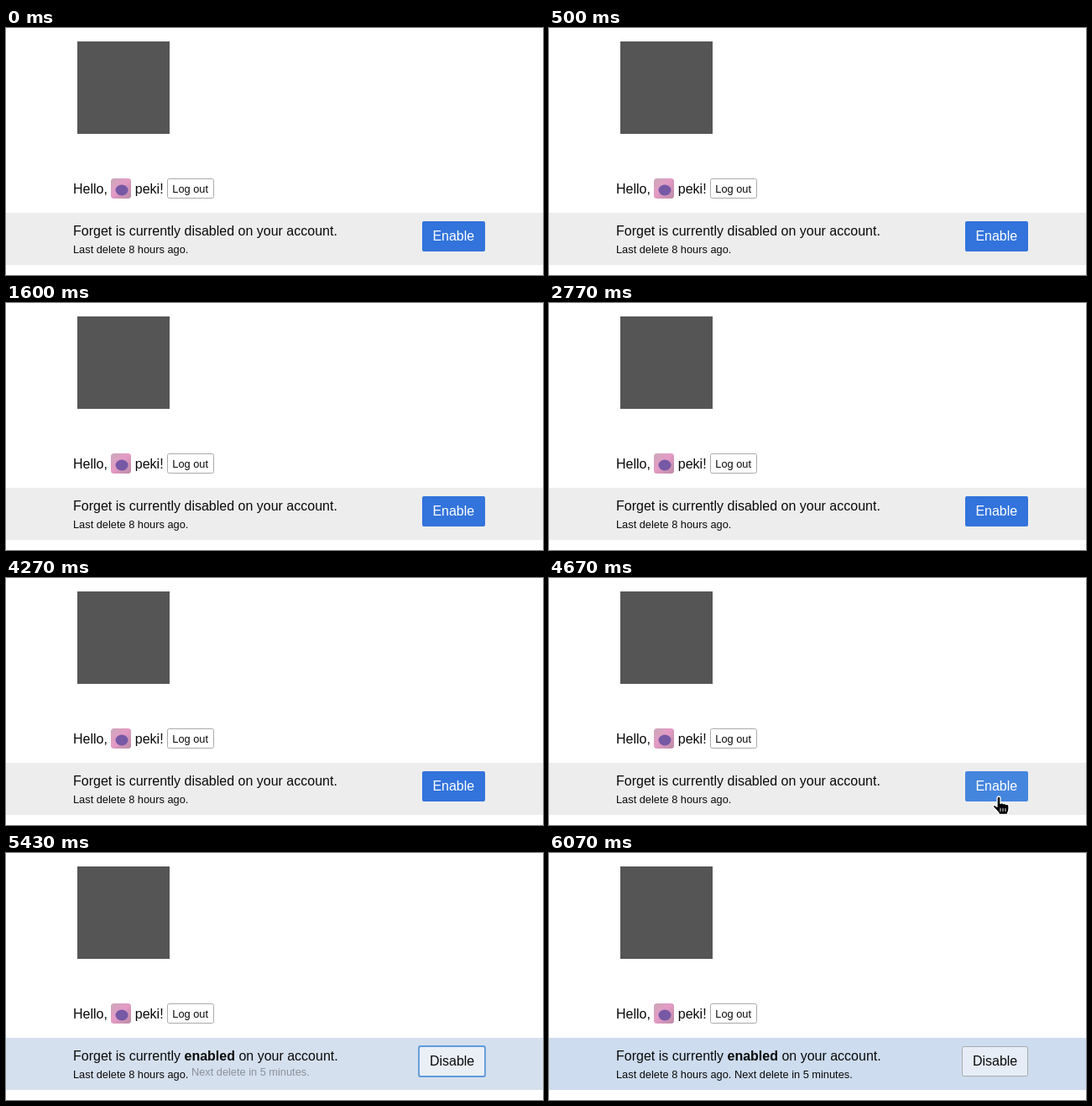
Recreate the animation shown at these times as an HTML page. Size 640x294 px, loop 8000 ms.

```html
<!DOCTYPE html>
<html lang="en">
<head>
<meta charset="utf-8">
<title>Account status</title>
<style>
  html, body { margin: 0; width: 100%; height: 100%; overflow: hidden; background: #fff; }
  svg { display: block; }
  text { font: 16px "Liberation Sans", Arial, sans-serif; fill: #0a0a0a; white-space: pre; }
  .small { font-size: 12.8px; }
  .light { fill: #fff; }
  .bold { font-weight: bold; }
</style>
</head>
<body>
<svg width="640" height="294" viewBox="0 0 640 294">
  <defs>
    <linearGradient id="pink" x2="1" y2="1">
      <stop offset="0" stop-color="#c9a9b8"/>
      <stop offset=".45" stop-color="#e59bc6"/>
      <stop offset="1" stop-color="#b98ba6"/>
    </linearGradient>
  </defs>

  <rect x="85" y="16" width="110" height="110" fill="#555"/>

  <text x="80" y="197">Hello,</text>
  <rect x="125" y="179" width="24" height="24" rx="3.5" fill="url(#pink)"/>
  <ellipse cx="138" cy="193" rx="7.5" ry="6.5" fill="#7658a5"/>
  <text x="153.8" y="197">peki!</text>
  <rect x="192.5" y="179.5" width="55" height="23" rx="2" fill="#fff" stroke="#aaa"/>
  <text class="small" x="198.3" y="196">Log out</text>

  <rect id="band" y="220" width="640" height="62"/>
  <text id="disabledText" x="80" y="247">Forget is currently disabled on your account.</text>
  <text id="enabledText" x="80" y="247">Forget is currently <tspan class="bold">enabled</tspan> on your account.</text>
  <text class="small" x="80" y="268">Last delete 8 hours ago.</text>
  <text id="next" class="small" x="220.9" y="268">Next delete in 5 minutes.</text>

  <g id="enable">
    <rect id="enableFill" x="496" y="230" width="75" height="36" rx="2"/>
    <text class="light" x="508.4" y="253">Enable</text>
  </g>
  <g id="disable">
    <rect x="492.5" y="230.5" width="78" height="35" rx="2" fill="#fff" fill-opacity=".5" stroke="#aaa"/>
    <text x="504.9" y="253">Disable</text>
  </g>
  <rect id="ring" y="230" height="36" rx="2" fill="none" stroke-width="1.8"/>

  <g id="cursor" fill="#000" stroke="#fff" stroke-width="1.3" stroke-linejoin="round">
    <path id="arrow" d="M0 0V16L4 12.5L6.8 18.5L9.6 17.2L6.9 11.4H12Z"/>
    <g id="hand">
      <path d="M-2 1.5Q-2-1 0-1T2 1.5V7.5Q4 5.8 5.4 7.8Q7.4 6.6 8.6 8.6Q12 7.6 12 10.8V14Q12 17 10.5 18.8V20.5H0V18.8L-6.4 11.8Q-7.2 9.4-5 9.2L-2 11.2Z"/>
      <path d="M2 13v4M5 13v4M8 13v4" stroke-width=".9" fill="none"/>
    </g>
  </g>
</svg>
<script>
const LOOP = 8000, ENTER = 4470, ARRIVE = 4970, PRESS = 5070, TOGGLE = 5200, LEAVE = 5230, GONE = 5420, BLUR = 6050;
const el = id => document.getElementById(id);
const show = (id, on) => el(id).setAttribute("visibility", on ? "visible" : "hidden");
const set = (id, attrs) => { for (const k in attrs) el(id).setAttribute(k, attrs[k]); };
const progress = (t, from, to) => Math.min(1, Math.max(0, (t - from) / (to - from)));
const mix = (a, b, p) => a + (b - a) * p;
const mixColor = (a, b, p) => `rgb(${a.map((v, i) => Math.round(mix(v, b[i], p)))})`;
const easeOut = p => 1 - (1 - p) ** 2;

// The CSS "ease" curve: cubic-bezier(.25, .1, .25, 1)
function ease(x) {
  let lo = 0, hi = 1;
  const bezier = (s, a, b) => 3 * s * (1 - s) ** 2 * a + 3 * s * s * (1 - s) * b + s ** 3;
  for (let i = 0; i < 20; i++) {
    const mid = (lo + hi) / 2;
    if (bezier(mid, .25, .25) < x) lo = mid; else hi = mid;
  }
  return bezier(lo, .1, 1);
}

function cursorAt(t) {
  if (t < LEAVE) {
    const p = easeOut(progress(t, ENTER, ARRIVE));
    return [mix(562, 521, p), mix(294, 242, p)];
  }
  const p = progress(t, LEAVE, GONE) ** 1.5;
  return [mix(521, 568, p), mix(242, 296, p)];
}

function draw(t) {
  const on = t >= TOGGLE;
  const [x, y] = cursorAt(t);
  const visible = t >= ENTER && t < GONE;
  const over = visible && y < 266 && x < 571;
  const reveal = progress(t, TOGGLE, 5830);

  set("band", { fill: mixColor([237, 237, 237], [205, 220, 238], ease(progress(t, TOGGLE, 5700))) });
  show("disabledText", !on);
  show("enabledText", on);
  set("next", { opacity: reveal, transform: `translate(0 ${mix(-4, 0, reveal)})` });

  show("enable", !on);
  show("disable", on);
  set("enableFill", { fill: over ? "#4485de" : "#3273dc" });
  show("ring", t >= PRESS && t < BLUR);
  set("ring", on ? { x: 492, width: 79, stroke: "#5f9bdc" } : { x: 496, width: 75, stroke: "#6ca2e4" });

  set("cursor", { transform: `translate(${Math.round(x)} ${Math.round(y)})` });
  show("hand", over);
  show("arrow", visible && !over);
}

const start = performance.now();
function tick() {
  draw((performance.now() - start) % LOOP);
  requestAnimationFrame(tick);
}
tick();
</script>
</body>
</html>
```
